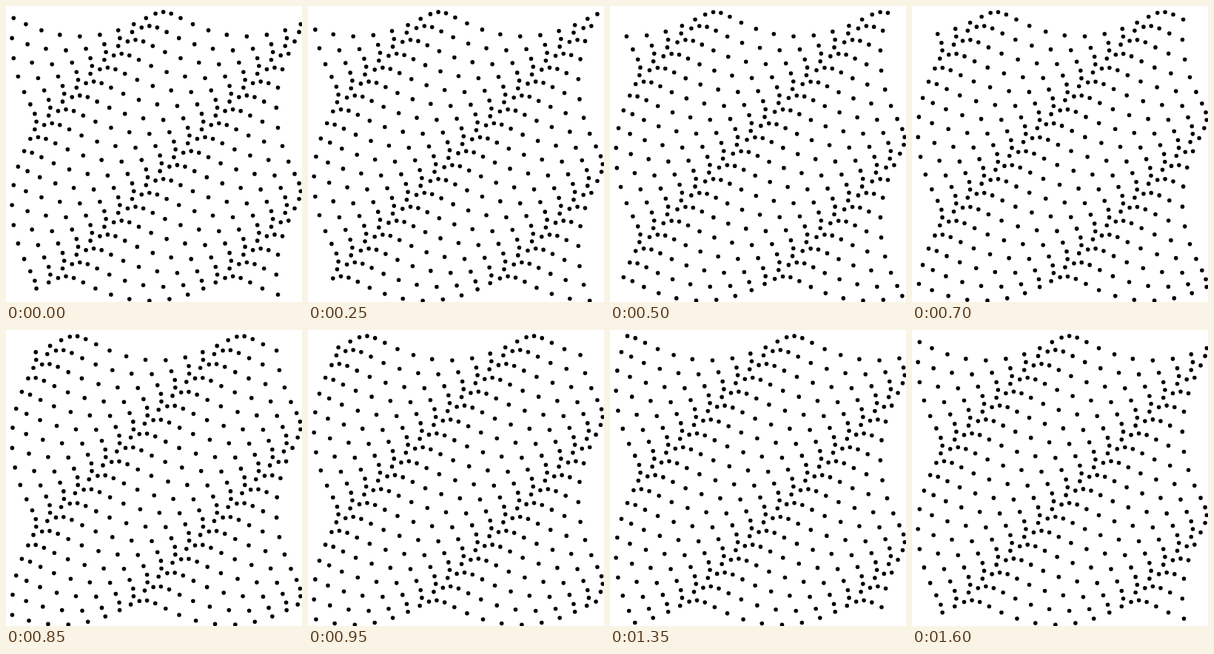
An HTML page with a canvas for the animation above (1.65 s loop, 400 by 400 pixels).

```html
<!DOCTYPE html>
<html lang="en">
<head>
<meta charset="utf-8">
<title>Orbiting dots</title>
<style>
  html, body { margin: 0; width: 100%; height: 100%; overflow: hidden; background: #fff; }
  canvas { display: block; width: 400px; height: 400px; }
</style>
</head>
<body>
<canvas id="stage" width="400" height="400"></canvas>
<script>
const ctx = document.getElementById('stage').getContext('2d');
const COUNT = 20;
const ORIGIN = 24.6;
const SPACING = 18.8;
const ORBIT = 16.5;
const DOT = 2.8;
const STEP_MS = 50;
const STEPS = 33;
const TAU = Math.PI * 2;

// Each dot circles its grid point; the phase advances along the diagonal.
function draw(step) {
  const turn = TAU * step / (STEPS - 1);
  ctx.fillStyle = '#fff';
  ctx.fillRect(0, 0, 400, 400);
  ctx.fillStyle = '#000';
  ctx.beginPath();
  for (let row = 0; row < COUNT; row++) {
    for (let col = 0; col < COUNT; col++) {
      const angle = turn + (row + col - 1) * TAU / 12;
      const x = ORIGIN + col * SPACING - ORBIT * Math.cos(angle);
      const y = ORIGIN + row * SPACING + ORBIT * Math.sin(angle);
      ctx.moveTo(x + DOT, y);
      ctx.arc(x, y, DOT, 0, TAU);
    }
  }
  ctx.fill();
}

const start = performance.now();
function tick() {
  const elapsed = performance.now() - start;
  draw(Math.floor(elapsed / STEP_MS) % STEPS);
  requestAnimationFrame(tick);
}
tick();
</script>
</body>
</html>
```
